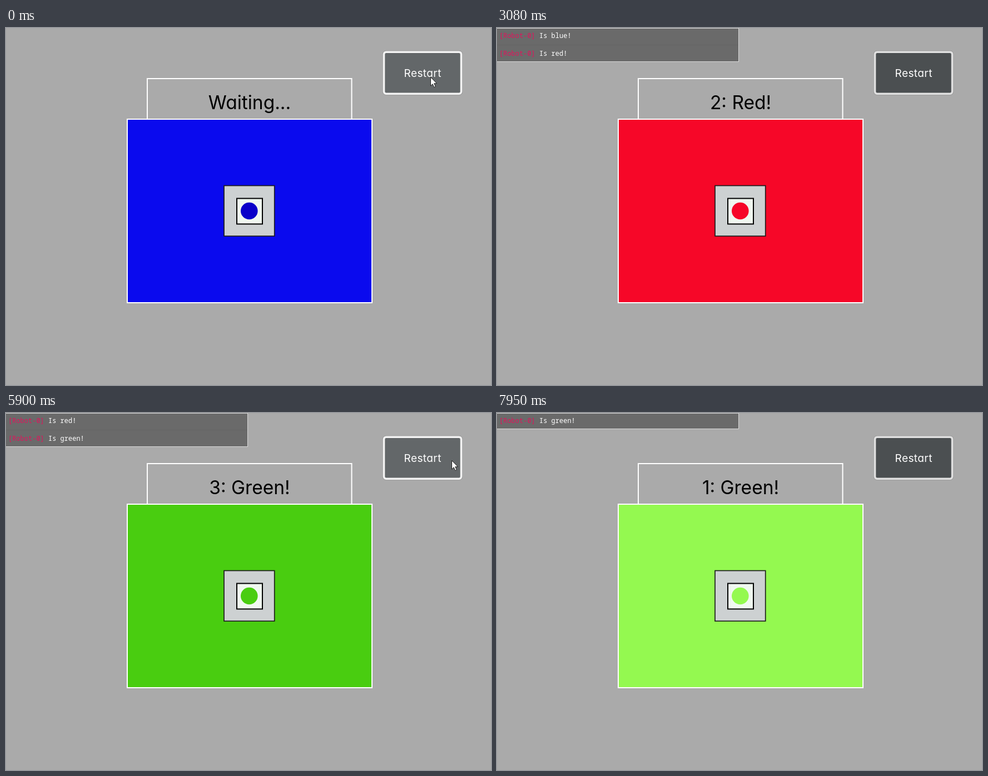
An HTML page for the animation above (8000 ms loop, 872 by 642 pixels).

```html
<!DOCTYPE html>
<html lang="en">
<head>
<meta charset="utf-8">
<title>Colour sensor</title>
<style>
  html, body { margin: 0; width: 100%; height: 100%; overflow: hidden; background: #aaa; }
  svg { display: block; width: 872px; height: 642px; }
  text { font-family: Inter, "Open Sans", sans-serif; font-feature-settings: "cv11"; white-space: pre; }
  .log text { font: 12px "Noto Sans Mono", "DejaVu Sans Mono", monospace; fill: #fff; }
  .log tspan { fill: #e0155c; }
  #face { fill: #4b4f51; stroke: #e0e0e0; }
  .hover #face { fill: #636769; stroke: #f3f3f3; }
</style>
</head>
<body>
<svg viewBox="0 0 872 642">
  <rect width="872" height="642" fill="#aaa"/>
  <rect x="254" y="91" width="367.5" height="73" fill="none" stroke="#fff" stroke-width="2"/>
  <text id="title" x="438" y="145.5" font-size="33.5" text-anchor="middle"></text>

  <rect id="screen" x="218" y="164" width="440" height="330" stroke="#fff" stroke-width="2"/>
  <rect x="392" y="283.5" width="90.7" height="90.7" fill="#cdd1d2" stroke="#1c1c1c" stroke-width="1.7"/>
  <rect x="415" y="306.5" width="46" height="46" fill="#f0f8f0" stroke="#000" stroke-width="2"/>
  <circle id="dot" cx="437.3" cy="329" r="15.3"/>

  <g id="button">
    <rect x="677.5" y="41.2" width="143" height="79" rx="5" fill="none" stroke="#959595"/>
    <rect id="face" x="679.5" y="43.2" width="139" height="75" rx="4" stroke-width="3.6"/>
    <text x="749.2" y="87.5" font-size="19" letter-spacing=".4" text-anchor="middle" fill="#fff">Restart</text>
  </g>

  <g id="log" class="log">
    <rect id="panel" x="-.5" y=".5" width="435" fill="#6a6a6a" stroke="#d8d8d8"/>
    <path id="rule" d="M0 30.5H434" stroke="#646464"/>
    <text x="4" y="18"><tspan>[Robot-0]</tspan> <tspan class="msg" style="fill:#fff"></tspan></text>
    <text x="4" y="50"><tspan>[Robot-0]</tspan> <tspan class="msg" style="fill:#fff"></tspan></text>
  </g>

  <path id="cursor" d="M0 0V15.5L3.6 12.2L6.2 18L8.8 16.9L6.2 11.2H11Z" fill="#fff" stroke="#222" stroke-linejoin="round"/>
</svg>
<script>
const LOOP = 8000, FRAME = 30;
const BLUE = '#0a0aee', NAVY = '#0900c9', RED = '#f60728', GREEN = '#49cd10', LIME = '#94f950';
const $ = id => document.getElementById(id);
const msgs = document.querySelectorAll('.msg');
const lines = document.querySelectorAll('#log text');

// Each entry overrides the state from its time on.
const events = [
  [0, { title: 'Waiting...', screen: BLUE, dot: NAVY, log: [] }],
  [30, { dot: BLUE }],
  [1080, { title: '1: Blue!', log: ['blue'] }],
  [1980, { title: 'Waiting...', screen: RED }],
  [2010, { dot: RED }],
  [3080, { title: '2: Red!', log: ['blue', 'red'] }],
  [4000, { title: 'Waiting...', screen: GREEN }],
  [4030, { dot: GREEN }],
  [4100, { log: ['red'] }],
  [5080, { title: '3: Green!', log: ['red', 'green'] }],
  [6090, { log: ['green'] }],
  [6730, { title: 'Waiting...', screen: LIME, dot: LIME, log: [] }],
  [7950, { title: '1: Green!', log: ['green'] }]
];

// Pointer moves: start, end, from, to, time it leaves the stage.
const moves = [
  [0, 0, [763, 88], [763, 88]],
  [260, 350, [768, 88], [857, 91], 380],
  [4980, 5040, [862, 86], [866, 86], 5110],
  [5780, 6120, [858, 87], [760, 84]],
  [6560, 6660, [760, 83], [761, 79]],
  [6930, 7000, [768, 80], [826, 88], 7040]
];

function pointer(t) {
  const [start, end, from, to, gone = LOOP] = moves.findLast(m => m[0] <= t);
  if (t >= gone) return null;
  const step = Math.floor((t - start) / FRAME) * FRAME;
  const u = end > start ? Math.min(1, step / (end - start)) : 1;
  const eased = gone < LOOP ? u : 1 - (1 - u) ** 2;
  return from.map((a, i) => Math.round(a + (to[i] - a) * eased));
}

function draw(t) {
  const s = Object.assign({}, ...events.filter(e => e[0] <= t).map(e => e[1]));
  $('title').textContent = s.title;
  $('screen').setAttribute('fill', s.screen);
  $('dot').setAttribute('fill', s.dot);

  const n = s.log.length;
  $('log').style.display = n ? '' : 'none';
  $('panel').setAttribute('height', n > 1 ? 60 : 28);
  $('rule').style.display = n > 1 ? '' : 'none';
  lines.forEach((line, i) => {
    line.style.display = i < n ? '' : 'none';
    msgs[i].textContent = i < n ? `Is ${s.log[i]}!` : '';
  });

  const p = pointer(t);
  $('cursor').style.display = p ? '' : 'none';
  if (p) $('cursor').setAttribute('transform', `translate(${p[0] + .5} ${p[1] + .5})`);
  $('button').setAttribute('class', p && p[0] < 821 ? 'hover' : '');
}

const began = performance.now();
function tick() {
  draw((performance.now() - began) % LOOP);
  requestAnimationFrame(tick);
}
tick();
</script>
</body>
</html>
```
